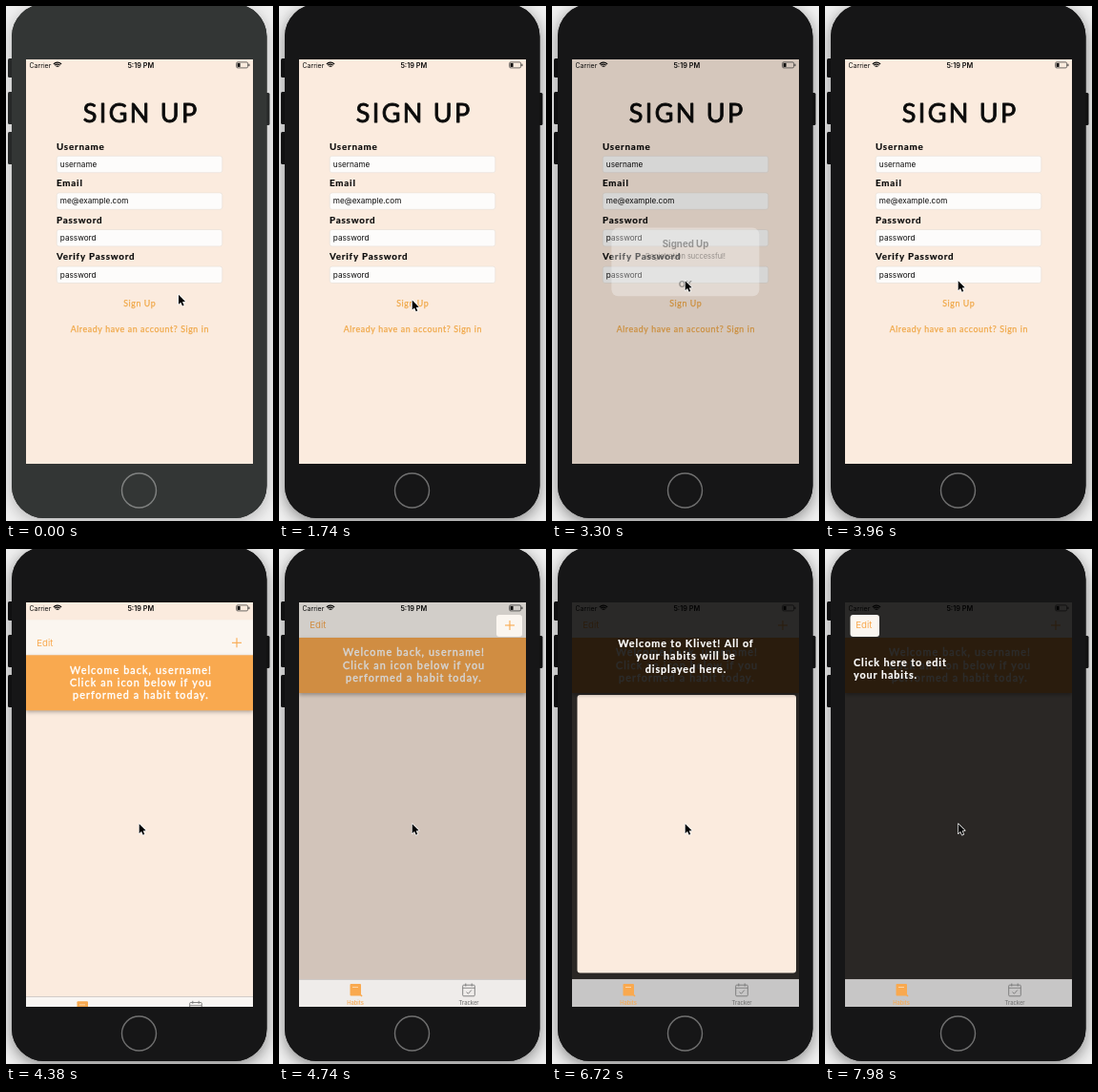
Animation, 280 px wide and 540 px high, one loop 8000 ms. Source, as an HTML page with a canvas:

```html
<!DOCTYPE html>
<html lang="en">
<head>
<meta charset="utf-8">
<title>Habit app sign up</title>
<style>
  html, body { margin: 0; width: 100%; height: 100%; overflow: hidden; background: #eee; }
  canvas { display: block; width: 280px; height: 540px; }
</style>
</head>
<body>
<canvas id="stage"></canvas>
<script>
const W = 280, H = 540, LOOP = 8000, STEP = 60;
const canvas = document.getElementById('stage');
const dpr = window.devicePixelRatio || 1;
canvas.width = W * dpr;
canvas.height = H * dpr;
const ctx = canvas.getContext('2d');

const ROUND = 'Lato, sans-serif';
const UI = 'Inter, "Liberation Sans", sans-serif';
const PEACH = '#fbebde', ORANGE = '#f9a94f', INK = '#0b0b0b';
const SCREEN = { x: 21, y: 56, w: 238, h: 424 };
const BODY = [6, -2, 267.5, 539, 34];
const TAB_Y = 451;

const clamp = v => Math.min(1, Math.max(0, v));
const ramp = (t, from, to) => clamp((t - from) / (to - from));
const smooth = v => v * v * (3 - 2 * v);
const lerp = (a, b, v) => a + (b - a) * v;
const mix = (a, b, v) => `rgb(${a.map((c, i) => Math.round(lerp(c, b[i], v)))})`;

function rect(x, y, w, h, fill) {
  ctx.fillStyle = fill;
  ctx.fillRect(x, y, w, h);
}

function rounded(x, y, w, h, r, fill, stroke, width = 1) {
  ctx.beginPath();
  ctx.roundRect(x, y, w, h, r);
  if (fill) { ctx.fillStyle = fill; ctx.fill(); }
  if (stroke) { ctx.strokeStyle = stroke; ctx.lineWidth = width; ctx.stroke(); }
}

function line(points, color, width) {
  ctx.beginPath();
  points.forEach(([x, y], i) => i ? ctx.lineTo(x, y) : ctx.moveTo(x, y));
  ctx.strokeStyle = color;
  ctx.lineWidth = width;
  ctx.stroke();
}

// A thin round outline softens the ends of the letters.
function text(str, x, y, { size, weight = 400, family = UI, color = INK, align = 'left', gap = 0, outline = 0 }) {
  ctx.font = `${weight} ${size}px ${family}`;
  ctx.letterSpacing = gap + 'px';
  ctx.textAlign = align;
  ctx.textBaseline = 'alphabetic';
  ctx.fillStyle = color;
  const left = align === 'center' ? x + gap / 2 : x;
  ctx.fillText(str, left, y);
  if (!outline) return;
  ctx.lineJoin = 'round';
  ctx.lineWidth = outline;
  ctx.strokeStyle = color;
  ctx.strokeText(str, left, y);
}

const TITLE = { size: 27, weight: 400, family: ROUND, align: 'center', gap: 2.3, outline: 0.8 };
const LABEL = { size: 9.8, weight: 700, family: ROUND, gap: 0.8, outline: 0.2 };
const LINK = { size: 8.8, weight: 400, family: ROUND, color: '#f0a849', align: 'center', gap: 0.6, outline: 0.25 };
const NOTE = { size: 10.8, weight: 400, family: ROUND, color: '#fff', gap: 1.1, outline: 0.4 };

function alpha(value, draw) {
  if (value <= 0) return;
  ctx.save();
  ctx.globalAlpha *= value;
  draw();
  ctx.restore();
}

function backdrop(active) {
  rect(0, 0, W, H, '#f0f0f0');
  ctx.save();
  ctx.shadowColor = `rgba(0,0,0,${lerp(0.25, 0.45, active)})`;
  ctx.shadowBlur = 16 * dpr;
  ctx.shadowOffsetY = 4 * dpr;
  rounded(...BODY, '#222');
  ctx.restore();
}

function phone(active) {
  const body = mix([51, 54, 53], [22, 22, 23], active);
  const key = mix([38, 40, 40], [16, 16, 17], active);
  [[2, 55, 20], [2, 90, 34], [2, 132, 34], [270.5, 91, 34]].forEach(([x, y, h]) => rounded(x, y, 6, h, 1.5, key));
  rounded(...BODY, body);
  ctx.beginPath();
  ctx.arc(139.5, 508, 18, 0, Math.PI * 2);
  ctx.strokeStyle = mix([128, 130, 129], [112, 112, 112], active);
  ctx.lineWidth = 1.4;
  ctx.stroke();
}

function statusBar() {
  text('Carrier', 24.4, 64.7, { size: 7 });
  text('5:19 PM', 141.3, 64.7, { size: 7.3, weight: 600, align: 'center' });
  for (const r of [1.8, 3.7, 5.6]) {
    ctx.beginPath();
    ctx.arc(54, 64.8, r, -Math.PI * 0.76, -Math.PI * 0.24);
    ctx.strokeStyle = INK;
    ctx.lineWidth = 1.2;
    ctx.stroke();
  }
  rounded(241.6, 58.9, 12, 6, 1.4, null, '#333', 0.7);
  rect(242.6, 59.9, 3, 4, INK);
  rect(254.4, 60.7, 1, 2.4, '#333');
}

function signUp() {
  rect(SCREEN.x, SCREEN.y, SCREEN.w, SCREEN.h, PEACH);
  text('SIGN UP', 140.5, 121.6, TITLE);
  const fields = [['Username', 'username'], ['Email', 'me@example.com'], ['Password', 'password'], ['Verify Password', 'password']];
  fields.forEach(([label, value], i) => {
    const y = 150.5 + i * 38.6;
    text(label, 53, y, LABEL);
    rounded(53.2, y + 6.8, 173.6, 17.4, 2.5, '#fdfcfb', '#e6ddd6', 0.6);
    text(value, 56.8, y + 18.3, { size: 8.2 });
  });
  text('Sign Up', 140, 315, LINK);
  text('Already have an account? Sign in', 140, 342.3, LINK);
}

function alertBox(show) {
  alpha(show, () => {
    rounded(62.4, 232.6, 155, 71.6, 7, '#f9f8f8');
    text('Signed Up', 140, 252.7, { size: 9.7, weight: 700, align: 'center' });
    text('Registration successful!', 140, 264.6, { size: 7.45, align: 'center' });
    text('OK', 140, 294.6, { size: 9.6, weight: 700, align: 'center' });
  });
}

function plus() {
  line([[237, 80], [247, 80]], ORANGE, 1.1);
  line([[242, 75], [242, 85]], ORANGE, 1.1);
}

function tabBar(dim) {
  rect(SCREEN.x, TAB_Y, SCREEN.w, 29, mix([249, 246, 243], [199, 198, 198], dim));
  rect(SCREEN.x, TAB_Y, SCREEN.w, 0.6, '#b9b5b2');
  rounded(74.5, 456, 11.5, 12.5, 1, ORANGE);
  line([[77, 459.5], [83, 459.5]], '#fff3e4', 0.6);
  line([[83, 465], [87, 469]], ORANGE, 1.6);
  text('Habits', 80, 477.7, { size: 5.8, weight: 500, color: ORANGE, align: 'center' });
  const grey = '#777';
  rounded(192.7, 457.2, 12.6, 11.6, 1, null, grey, 0.9);
  line([[192.7, 460.3], [205.3, 460.3]], grey, 0.8);
  line([[195.8, 455.5], [195.8, 458.5]], grey, 0.9);
  line([[202.2, 455.5], [202.2, 458.5]], grey, 0.9);
  line([[196.6, 464.4], [198.4, 466.3], [201.8, 462.5]], grey, 0.9);
  text('Tracker', 199, 477.7, { size: 5.8, weight: 500, color: grey, align: 'center' });
}

function habits(dim) {
  rect(SCREEN.x, SCREEN.y, SCREEN.w, SCREEN.h, PEACH);
  rect(SCREEN.x, SCREEN.y, SCREEN.w, 37, '#fbf6f0');
  text('Edit', 32.3, 83.4, { size: 9.6, color: ORANGE });
  plus();
  ctx.save();
  ctx.shadowColor = 'rgba(0,0,0,.3)';
  ctx.shadowBlur = 4 * dpr;
  ctx.shadowOffsetY = 1.5 * dpr;
  rect(SCREEN.x, 93, SCREEN.w, 58, ORANGE);
  ctx.restore();
  ['Welcome back, username!', 'Click an icon below if you', 'performed a habit today.']
    .forEach((s, i) => text(s, 141, 112.3 + i * 13.4, { ...NOTE, align: 'center' }));
  tabBar(dim);
}

// Guided tour: each stop has a cutout, a caption and a start time.
const TOUR = [
  { at: 4680, box: [228, 69, 27, 23], lines: ['Click here to add a', 'habit.'], x: 251, y: 122.6, align: 'right' },
  { at: 5400, box: [26.5, 153, 229.5, 291.5], lines: ['Welcome to Klivet! All of', 'your habits will be', 'displayed here.'], x: 140, y: 103, align: 'center' },
  { at: 7080, box: [26.5, 69, 30.5, 23], lines: ['Click here to edit', 'your habits.'], x: 30, y: 122.6, align: 'left' }
];

function tour(t, show) {
  if (show <= 0) return;
  const index = TOUR.filter(s => t >= s.at).length - 1;
  const stop = TOUR[index];
  const before = TOUR[Math.max(0, index - 1)];
  const move = smooth(ramp(t, stop.at, stop.at + 300));
  const box = stop.box.map((v, i) => lerp(before.box[i], v, move));
  alpha(show, () => {
    ctx.beginPath();
    ctx.rect(SCREEN.x, SCREEN.y, SCREEN.w, TAB_Y - SCREEN.y);
    ctx.roundRect(...box, 3);
    ctx.fillStyle = 'rgba(0,0,0,.83)';
    ctx.fill('evenodd');
  });
  alpha(ramp(t, stop.at + 60, stop.at + 360), () => {
    stop.lines.forEach((s, i) => text(s, stop.x, stop.y + i * 13.3, { ...NOTE, weight: 700, gap: 0.9, outline: 0.2, align: stop.align }));
  });
}

function cursor(t) {
  const toButton = smooth(ramp(t, 120, 960));
  const toOk = smooth(ramp(t, 2580, 2940));
  ctx.save();
  ctx.translate(lerp(181, 139.7, toButton), lerp(302.8, 308.6, toButton) - 20.4 * toOk);
  ctx.beginPath();
  [[0, 0], [0, 10], [2.3, 7.9], [4, 11.6], [5.6, 10.9], [4, 7.3], [7, 7.1]]
    .forEach(([x, y]) => ctx.lineTo(x, y));
  ctx.closePath();
  ctx.lineJoin = 'round';
  ctx.strokeStyle = '#fff';
  ctx.lineWidth = 1.4;
  ctx.stroke();
  ctx.fillStyle = '#000';
  ctx.fill();
  ctx.restore();
}

function modalOffset(t) {
  const s = Math.max(0, t - 4080) * 0.0164;
  const left = (1 + s) * Math.exp(-s);
  return left < 0.001 ? 0 : SCREEN.h * left;
}

function draw(t) {
  ctx.setTransform(dpr, 0, 0, dpr, 0, 0);
  const active = t >= 960 ? 1 : 0;
  backdrop(active);
  phone(active);

  ctx.save();
  ctx.beginPath();
  ctx.rect(SCREEN.x, SCREEN.y, SCREEN.w, SCREEN.h);
  ctx.clip();
  const offset = modalOffset(t);
  const touring = ramp(t, 4680, 4980);
  if (offset > 0) {
    signUp();
    const shown = smooth(ramp(t, 1980, 2220));
    const fade = ramp(t, 3120, 3400);
    const present = shown * (1 - fade);
    rect(SCREEN.x, SCREEN.y, SCREEN.w, SCREEN.h, `rgba(0,0,0,${0.43 * present})`);
    ctx.save();
    const grow = lerp(1.15, 1, shown);
    ctx.translate(140, 268);
    ctx.scale(grow, grow);
    ctx.translate(-140, -268);
    alertBox(present);
    ctx.restore();
  }
  if (t >= 4080) {
    ctx.save();
    ctx.translate(0, offset);
    habits(touring);
    ctx.restore();
  }
  statusBar();
  tour(t, touring);
  ctx.restore();
  cursor(t);
}

function frame(now) {
  const t = now % LOOP;
  draw(t < 120 ? 0 : Math.floor(t / STEP) * STEP);
  requestAnimationFrame(frame);
}
draw(0);
requestAnimationFrame(frame);
</script>
</body>
</html>
```
